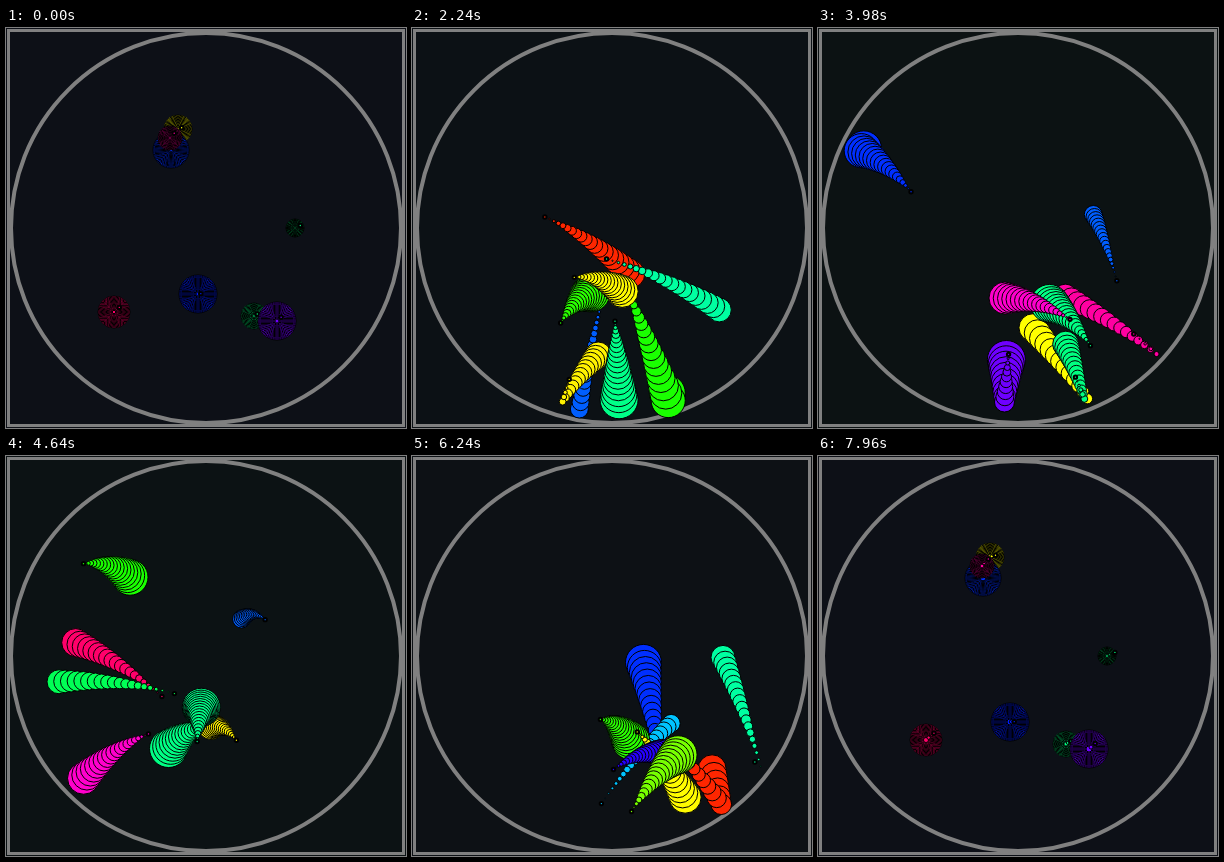
Write an HTML page with a canvas that moves like this. It is 400 px wide and 400 px high and loops after 7.98 s.

```html
<!DOCTYPE html>
<html lang="en">
<head>
<meta charset="utf-8">
<title>Worms in a ring</title>
<style>
  html, body { margin: 0; width: 100%; height: 100%; overflow: hidden; background: #0d1117; }
  canvas { display: block; width: 400px; height: 400px; }
</style>
</head>
<body>
<canvas id="stage" width="400" height="400"></canvas>
<script>
const ctx = document.getElementById('stage').getContext('2d');
const LOOP = 7980, STEP = 20, HALF = 200;
const CENTER = 200, RING = 195, WALL = 192.5;
const GRAVITY = 0.108, SEGMENTS = 20, LEAD = 2;

// Falls freely; at the wall it keeps its speed, turns to the center and takes its next hue.
function worm(size, x, y, vx, vy, hues) {
  const track = [];
  let bounces = 0;
  for (let n = 0; n < HALF + LEAD; n++) {
    track.push({ x, y, hue: hues[bounces % hues.length] });
    x += vx;
    y += vy;
    vy += GRAVITY;
    const dx = x - CENTER, dy = y - CENTER, dist = Math.hypot(dx, dy);
    if (dist + size > WALL && dx * vx + dy * vy > 0) {
      const speed = Math.hypot(vx, vy);
      vx = -speed * dx / dist;
      vy = -speed * dy / dist;
      bounces++;
    }
  }
  return { size, track };
}

const worms = [
  worm(14, 172, 101, 1.83, -0.70, [60, 9, 335]),
  worm(18, 165, 122, 0.95, -2.52, [229, 114]),
  worm(12, 164, 110, 2.10, -2.42, [322, 158, 140]),
  worm(9, 289, 200, 2.64, -1.30, [150, 194, 218]),
  worm(19, 192, 266, 1.41, -0.23, [233, 110, 151]),
  worm(16, 108, 284, 2.655, -2.36, [335, 59, 312]),
  worm(13, 248, 288, 1.64, -1.08, [150, 249, 57]),
  worm(19, 271, 293, 2.05, -1.95, [266, 92, 152])
];

function disc({ x, y }, r) {
  ctx.beginPath();
  ctx.arc(x, y, r, 0, Math.PI * 2);
  ctx.fill();
  ctx.stroke();
}

// Each segment sits where the head was some steps ago, the largest one last.
function drawWorm({ size, track }, n) {
  const head = n + LEAD;
  ctx.fillStyle = `hsl(${track[head].hue} 100% 50%)`;
  ctx.strokeStyle = '#000';
  ctx.lineWidth = 1;
  for (let i = SEGMENTS - 1; i > 0; i--) {
    disc(track[Math.max(head - i, 0)], size * i / (SEGMENTS - 1));
  }
  ctx.lineWidth = 2;
  disc(track[head], 1.7);
}

function drawStage(n) {
  const u = n / (HALF - 1);
  ctx.fillStyle = `rgb(${13 - u}, ${16 + 2 * u}, ${23 - 4 * u})`;
  ctx.fillRect(0, 0, 400, 400);
  ctx.strokeStyle = '#808080';
  ctx.lineWidth = 3;
  ctx.strokeRect(2.5, 2.5, 395, 395);
  ctx.lineWidth = 4;
  ctx.beginPath();
  ctx.arc(CENTER, CENTER, RING, 0, Math.PI * 2);
  ctx.stroke();
}

const start = performance.now();
function render() {
  const step = Math.floor((performance.now() - start) % LOOP / STEP);
  const n = Math.min(step, 2 * HALF - 1 - step);
  drawStage(n);
  worms.forEach(w => drawWorm(w, n));
  requestAnimationFrame(render);
}
render();
</script>
</body>
</html>
```
